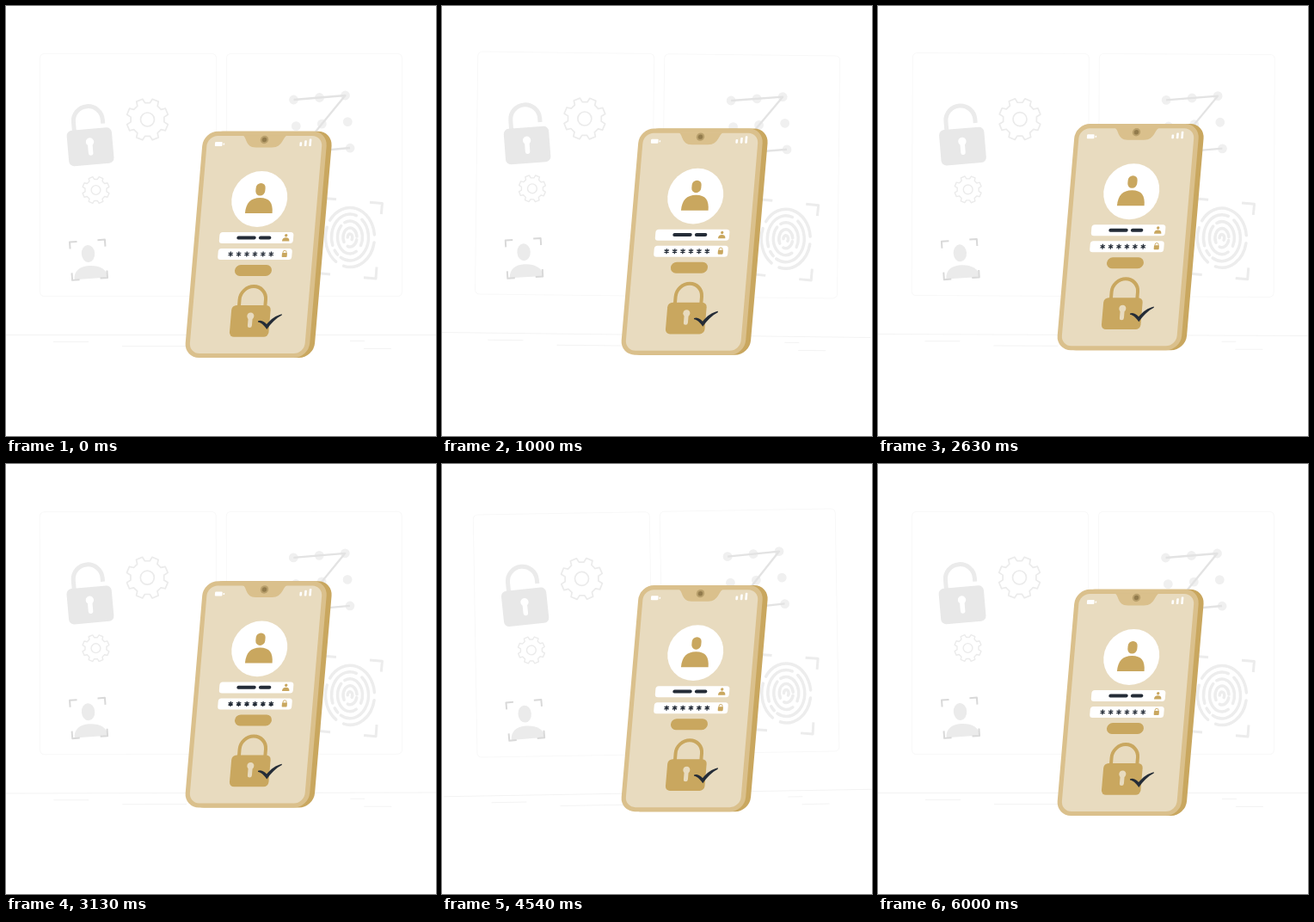
An HTML page that plays this animation: 500x500 px, repeating every 6040 ms.

```html
<!DOCTYPE html>
<html lang="en">
<head>
<meta charset="utf-8">
<title>Secure login</title>
<style>
  html, body { margin: 0; width: 100%; height: 100%; overflow: hidden; background: #fff; }
  svg { display: block; width: 100%; height: 100%; }
  .gold { fill: #c9a75f; }
  .frame { fill: #dac08c; }
  .screen { fill: #e8dbbf; }
  .ink { fill: #242c37; }
  .white { fill: #fff; }
  .line { fill: none; stroke-linejoin: round; }
</style>
</head>
<body>
<svg viewBox="0 0 500 500">
  <g id="backdrop">
    <g class="line" stroke="#f8f8f8">
      <rect x="39.5" y="55.5" width="205" height="282" rx="5"/>
      <rect x="256.5" y="55.5" width="204" height="282" rx="5"/>
    </g>
    <path class="line" stroke="#f3f3f3" d="M0 382.5H500M55 390.5H96M135 395.5H210M400 389.5H417M416 398.5H448"/>

    <g transform="rotate(-5 98 163.5)">
      <path class="line" stroke="#ebebeb" stroke-width="5" d="M81 145V133.500a17 17 0 0 1 34 0V138"/>
      <rect x="71.800" y="143" width="52.500" height="41.500" rx="6" fill="#e8e8e8"/>
      <circle class="white" cx="98" cy="158" r="4.700"/>
      <path class="line" stroke="#fff" stroke-width="5.500" stroke-linecap="round" d="M98 160V171"/>
    </g>

    <g id="gears" class="line" stroke="#ebebeb"></g>

    <g transform="rotate(-4 96 295)">
      <path fill="#ebebeb" d="M78 317c0-10 7-15 18-15s21 5 21 15z"/>
      <ellipse cx="96" cy="288" rx="7.700" ry="10" fill="#ebebeb"/>
      <path class="line" stroke="#d9d9d9" stroke-width="2"
        d="M75.500 281V273H84M108 273H116.500V281M75.500 309V317.500H84M108 317.500H116.500V309"/>
    </g>

    <g id="dots" fill="#f0f0f0"></g>
    <path class="line" stroke="#e3e3e3" stroke-width="2.300" d="M334.500 109L394.500 104L340 170.500L400 165"/>

    <path class="line" stroke="#ececec" stroke-width="3" stroke-linejoin="miter"
      d="M369 236L370 223.500L384 224.700M423 228.200L437.500 229.500L436.300 242M364.500 299L364 310.700L377 311.900M416 315.700L430 317L431 303.500"/>
    <g id="print" class="line" stroke="#ededed" stroke-width="3.500" stroke-linecap="round"></g>
  </g>

  <g id="phone">
    <g transform="matrix(1 0 -.085 1 12.410 0)">
      <rect class="gold" x="235.500" y="145.800" width="144.500" height="263.200" rx="17"/>
      <rect class="frame" x="229.600" y="145.800" width="144.500" height="263.200" rx="17"/>
      <rect class="screen" x="234.800" y="151" width="133.800" height="253" rx="12"/>
      <path class="frame" d="M275 150.500C281 151 279 164.500 292 164.500H311C324 164.500 322 151 328 150.500Z"/>
      <circle cx="301.300" cy="155.500" r="4.700" fill="#b9a06c"/>
      <circle cx="301.300" cy="155.500" r="2.700" fill="#927b4c"/>

      <g class="white">
        <rect x="244.200" y="158" width="8.600" height="5" rx="1"/>
        <rect x="253.800" y="159.500" width="1.600" height="2" rx=".5"/>
        <rect x="342.700" y="158.300" width="2.600" height="4.700" rx=".8"/>
        <rect x="348.200" y="156.300" width="2.600" height="6.700" rx=".8"/>
        <rect x="353.600" y="154.500" width="2.600" height="8.500" rx=".8"/>
        <circle cx="301.400" cy="224.500" r="32.400"/>
        <rect x="258.600" y="263" width="86" height="13" rx="3.500"/>
        <rect x="258.600" y="282" width="86" height="13" rx="3.500"/>
      </g>

      <g class="gold">
        <rect x="296.200" y="206" width="11" height="14.500" rx="5.400"/>
        <path d="M286 241C286 229 291 223 302 223S317.700 229 317.700 241Z"/>
        <circle cx="336" cy="266.800" r="1.700"/>
        <path d="M331.800 273.500q0-4.200 4.200-4.200t4.200 4.200z"/>
        <rect x="333" y="287" width="6" height="5" rx=".8"/>
        <path class="line" stroke="#c9a75f" stroke-width=".9" d="M334 287.500v-1.200a2 2 0 0 1 4 0v1.200"/>
        <rect x="279.700" y="301" width="43" height="13" rx="6.500"/>
        <path class="line" stroke="#c9a75f" stroke-width="4" d="M288.200 351V341.300a15.200 15.200 0 0 1 30.400 0V351"/>
        <rect x="279.800" y="348" width="45.500" height="36.800" rx="5.500"/>
      </g>

      <circle class="screen" cx="302.600" cy="360.600" r="4"/>
      <path class="line" stroke="#e8dbbf" stroke-width="5" stroke-linecap="round" d="M302.600 362V371.500"/>

      <g class="ink">
        <rect x="278.800" y="267.400" width="22.400" height="4" rx="2"/>
        <rect x="304.400" y="267.400" width="14.400" height="4" rx="2"/>
      </g>
      <path id="stars" class="line" stroke="#242c37" stroke-width="1.300"/>
    </g>
    <path class="ink" d="M293 366.300C297 364.500 301 367.500 303 370C308 364 314 359.700 320.800 358.200V359.500C314 363 308 369 303.300 376C300 371.500 297 368 293 367.500Z"/>
  </g>
</svg>
<script>
const LOOP = 6040, SWING = 6000, LIFT = 10;
const $ = id => document.getElementById(id);
const polar = (cx, cy, rx, ry, deg) => {
  const a = deg * Math.PI / 180;
  return `${(cx + rx * Math.cos(a)).toFixed(2)} ${(cy + ry * Math.sin(a)).toFixed(2)}`;
};

function gear(cx, cy, r, hub, width) {
  const points = [];
  for (let i = 0; i < 8; i++) {
    const mid = 22.5 + 45 * i;
    for (const [turn, size] of [[-14, .8], [-9, 1], [9, 1], [14, .8]])
      points.push(polar(cx, cy, r * size, r * size, mid + turn));
  }
  return `<path stroke-width="${width}" d="M${points.join('L')}Z"/>
    <circle stroke-width="${width}" cx="${cx}" cy="${cy}" r="${hub}"/>`;
}

function arc(rx, ry, from, to) {
  const start = polar(400, 269, rx, ry, from), end = polar(400, 269, rx, ry, to);
  return `<path d="M${start}A${rx} ${ry} 0 ${to - from > 180 ? 1 : 0} 1 ${end}"/>`;
}

function star(x, y) {
  return [30, 90, 150].map(a =>
    `M${polar(x, y, 3, 3, a)}L${polar(x, y, 3, 3, a + 180)}`).join('');
}

$('gears').innerHTML = gear(164.5, 132, 24.5, 8, 1.7) + gear(104.5, 214, 15.8, 5.4, 1.4);

for (let row = 0; row < 3; row++)
  for (let col = 0; col < 3; col++)
    $('dots').innerHTML +=
      `<circle cx="${334.5 + 30 * col + 2.8 * row}" cy="${109 - 2.5 * col + 30.6 * row}" r="5.4"/>`;

$('print').innerHTML = [
  [28.5, 34.5, 215, 355], [28.5, 34.5, 10, 105], [28.5, 34.5, 125, 200],
  [21.5, 27, 160, 290], [21.5, 27, 310, 480], [21.5, 27, 132, 146],
  [14.5, 19, 60, 225], [14.5, 19, 245, 390],
  [8, 11, 150, 355], [8, 11, 15, 110],
  [2.8, 4, 180, 400]
].map(a => arc(...a)).join('');

$('stars').setAttribute('d', Array.from({ length: 6 }, (_, i) => star(273.3 + 9.42 * i, 288.5)).join(''));

// Triangle wave: 0 at whole cycles, 1 halfway.
const triangle = p => 1 - Math.abs(1 - 2 * (p - Math.floor(p)));

function render(ms) {
  const p = (ms % LOOP) / SWING;
  const tilt = 2 * triangle(p + .25) - 1;
  $('phone').setAttribute('transform', `translate(0 ${-LIFT * triangle(p)})`);
  $('backdrop').setAttribute('transform', `rotate(${tilt} 250 250)`);
}

const begin = performance.now();
function tick() {
  render(performance.now() - begin);
  requestAnimationFrame(tick);
}
tick();
</script>
</body>
</html>
```
